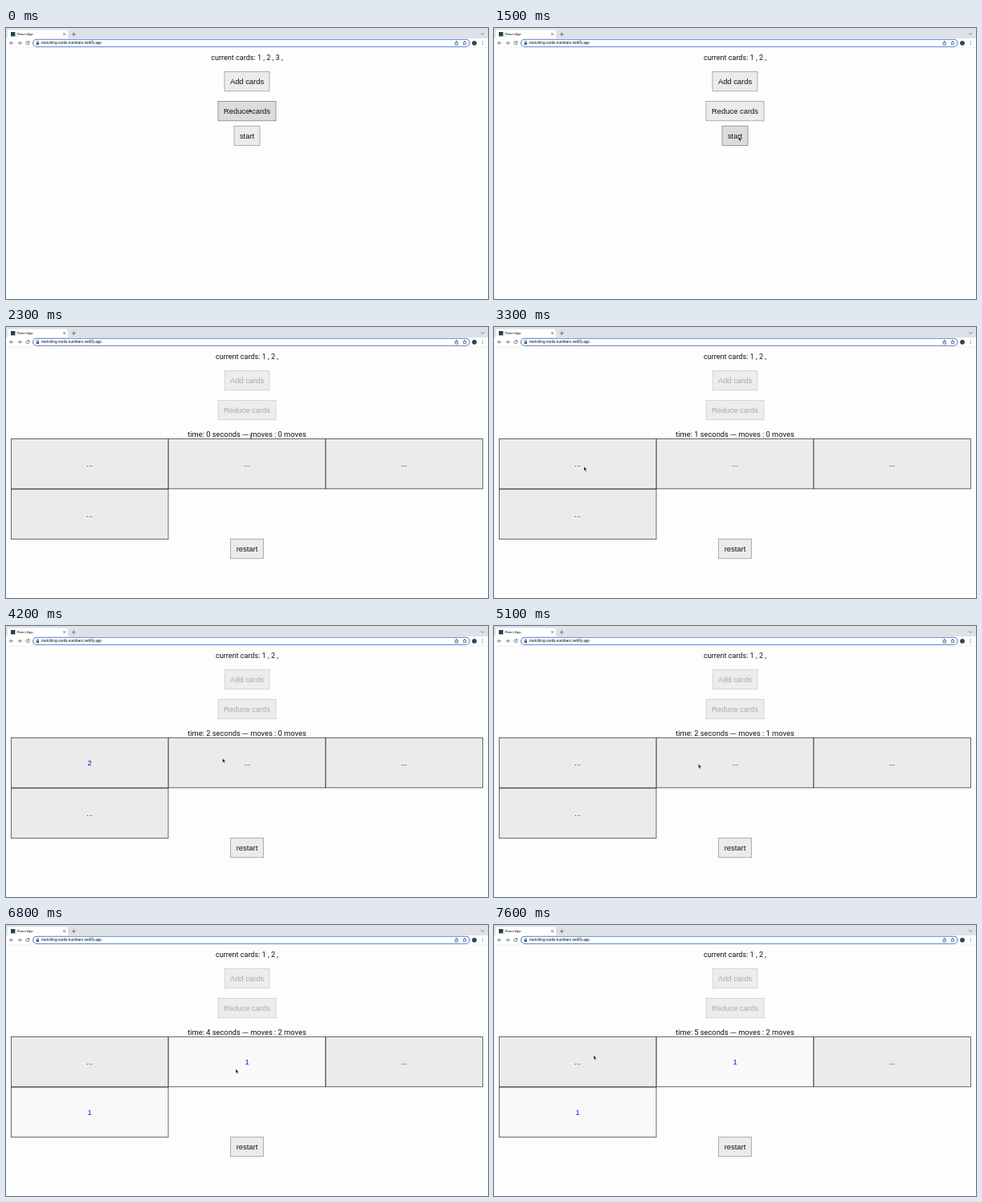
Write an HTML page that moves like this. It is 600x338 px and loops after 8 s.

```html
<!DOCTYPE html>
<html lang="en">
<head>
<meta charset="utf-8">
<title>Matching cards</title>
<style>
html, body { margin: 0; width: 100%; height: 100%; overflow: hidden; background: #fdfdfd; }
svg { display: block; width: 100vw; height: 100vh; }
text { font-family: Roboto, Inter, sans-serif; fill: #111; }
.ui { font-size: 4.3px; }
.mid { text-anchor: middle; }
.btn text, .card text { font: 9.4px "Liberation Sans", Arial, sans-serif; text-anchor: middle; }
.btn rect { fill: #ebebeb; stroke: #929292; stroke-width: .7; }
.btn.hover rect { fill: #dcdcdd; stroke: #777; }
.btn.press rect { fill: #f4f4f4; stroke: #a0a0a0; }
.btn.off rect { fill: #ececec; stroke: #cbcbcb; }
.btn.off text { fill: #a9a9a9; }
.card rect { fill: #ebebec; stroke: #444; stroke-width: .8; }
.card text { fill: #1a10cf; }
.card.dark text { fill: #20203c; }
.card.done rect { fill: #f9f9fb; }
.icon { fill: none; stroke: #555a60; stroke-width: .75; stroke-linecap: round; stroke-linejoin: round; }
</style>
</head>
<body>
<svg id="stage" viewBox="0 0 600 338" preserveAspectRatio="none">
  <rect width="600" height="338" fill="#fdfdfd"/>
  <rect width="600" height="13.5" fill="#dee1e6"/>
  <path d="M0 13.5Q2 13.5 2 11.5V5Q2 2.5 4.500 2.500H74.500Q77 2.500 77 5V11.500Q77 13.500 79 13.500Z" fill="#fff"/>
  <rect y="13" width="600" height="11.500" fill="#fff"/>
  <path d="M0 24.700H600" stroke="#e6e7e9" stroke-width=".5"/>
  <rect x="6" y="5" width="5.400" height="5.400" fill="#23434d"/>
  <text class="ui" x="14" y="9.300">React App</text>
  <path class="icon" d="M71.300 6.300l2.600 2.600m0-2.600l-2.600 2.600M82.300 7.800h4m-2-2v4M591.500 6.700l1.700 1.700 1.700-1.700"/>
  <path class="icon" d="M8.800 18.700H4.800m1.800-1.800l-1.800 1.800 1.800 1.800M15 18.700h4m-1.800-1.800l1.800 1.800-1.800 1.800M28.600 17.500a2 2 0 1 0 .3 1.700M28.900 16.500v1.500h-1.500"/>
  <rect x="33.600" y="14.200" width="543.500" height="9" rx="4.500" fill="#fff" stroke="#4a7fe0" stroke-width="1.100"/>
  <path d="M37.700 18.200h3.400v2.800h-3.400z" fill="#555a60"/>
  <path class="icon" d="M38.400 18v-.7a1 1 0 0 1 2 0v.7"/>
  <text class="ui" x="44" y="20.300" style="font-size:4.700px">matching-cards-numbers.netlify.app</text>
  <path class="icon" stroke-width=".5" d="M559.800 18h-.8v3h3.600v-3h-.8M560.800 19.300v-3m-1 1l1-1 1 1M571 16.400l.7 1.500 1.700.2-1.200 1.100.3 1.700-1.500-.8-1.500.8.3-1.700-1.200-1.100 1.700-.2z"/>
  <circle cx="583" cy="18.800" r="2.900" fill="#294650"/>
  <path d="M593.300 16.700v.01m0 1.990v.01m0 1.990v.01" stroke="#444" stroke-width="1" stroke-linecap="round"/>
  <text id="current" class="mid" x="300" y="39.900" font-size="9.050"></text>
  <g id="buttons"></g>
  <g id="game">
    <text id="status" class="mid" x="300" y="137.300" font-size="9.300"></text>
    <g id="cards"></g>
  </g>
  <path id="arrow" d="M0 0V5.300L1.200 4.200 2 6.200 3 5.800 2.200 3.900H3.800Z" fill="#111" stroke="#fff" stroke-width=".4"/>
  <path id="beam" d="M-1 -2.800Q0 -2.800 0 -2V2Q0 2.800 -1 2.800M1 -2.800Q0 -2.800 0 -2V2Q0 2.800 1 2.800" fill="none" stroke="#333" stroke-width=".6"/>
</svg>
<script>
const LOOP = 8000, STEP = 100;
const $ = id => document.getElementById(id);

function box(parent, cls, x, y, w, h, label) {
  const g = document.createElementNS("http://www.w3.org/2000/svg", "g");
  g.setAttribute("class", cls);
  g.innerHTML = `<rect x="${x}" y="${y}" width="${w}" height="${h}"/>` +
    `<text x="${x + w / 2}" y="${y + h / 2 + 3.4}">${label}</text>`;
  parent.append(g);
  return { g, label: g.lastChild, mid: y + h / 2 };
}

const add = box($("buttons"), "btn", 272, 54.5, 56, 24.3, "Add cards");
const reduce = box($("buttons"), "btn", 264, 91.5, 72, 24.3, "Reduce cards");
const start = box($("buttons"), "btn", 284, 122.2, 32, 24.3, "start");
box($("game"), "btn", 279.5, 264.5, 41, 24.3, "restart");
const cards = [0, 1, 2, 3].map(i =>
  box($("cards"), "card", 6.4 + i % 3 * 195.8, 139.4 + (i > 2 ? 62.9 : 0), 195.6, 62.4, "..."));

// Pointer moves: first step, last step, end point
const moves = [
  [100, 100, 303, 103.5],
  [1200, 1500, 304.5, 135.5],
  [3000, 3300, 112, 174],
  [4000, 4200, 269.5, 165],
  [5000, 5800, 150.5, 221],
  [6200, 6500, 286, 179.5],
  [7400, 7600, 124, 162.5]
];

function pointer(t) {
  let x = 303, y = 100.5;
  for (const [from, to, ex, ey] of moves) {
    if (t < from) break;
    const p = Math.min(1, (t - from + STEP) / (to - from + STEP));
    const k = p * p * (3 - 2 * p);
    x += (ex - x) * k;
    y += (ey - y) * k;
  }
  return [x, y];
}

const show = (el, on) => el.setAttribute("visibility", on ? "visible" : "hidden");
const state = (b, name) => b.g.setAttribute("class", `btn ${name}`);

function render(time) {
  const t = Math.floor(time / STEP) * STEP;
  const playing = t >= 2300, matched = t >= 6800;
  const [x, y] = pointer(t);

  $("current").textContent = `current cards: 1 , 2 ,${t < 400 ? " 3 ," : ""}`;
  state(add, playing ? "off" : "");
  state(reduce, playing ? "off" : t < 1300 ? "hover" : "");
  state(start, t >= 2200 ? "press" : t >= 1400 ? "hover" : "");
  show(start.g, !playing);
  show($("game"), playing);

  const seconds = Math.max(0, Math.floor((t - 2200) / 1000));
  const turns = matched ? 2 : t >= 4500 ? 1 : 0;
  $("status").textContent = `time: ${seconds} ${seconds === 1 ? "seconds" : "seconds"} --- moves : ${turns} moves`;

  const faces = [
    t >= 3600 && t < 4500 ? "2" : "...",
    matched ? "1" : "...",
    "...",
    t >= 6100 ? "1" : "..."
  ];
  const raised = t >= 3200 && t < 4500 || t >= 6100;
  cards.forEach((c, i) => {
    c.label.textContent = faces[i];
    c.label.setAttribute("y", c.mid + (faces[i] !== "..." ? 3.5 : raised ? 3 : 3.8));
    c.g.setAttribute("class", "card" + (i === 2 ? " dark" : "") + (matched && i % 2 ? " done" : ""));
  });

  const beam = t >= 2200 && t < 3000;
  show($("arrow"), !beam);
  show($("beam"), beam);
  $("arrow").setAttribute("transform", `translate(${x} ${y})`);
  $("beam").setAttribute("transform", `translate(${t < 2800 ? 305 : 304.6} 137)`);
}

const origin = performance.now();
function frame() {
  render((performance.now() - origin) % LOOP);
  requestAnimationFrame(frame);
}
frame();
</script>
</body>
</html>
```
